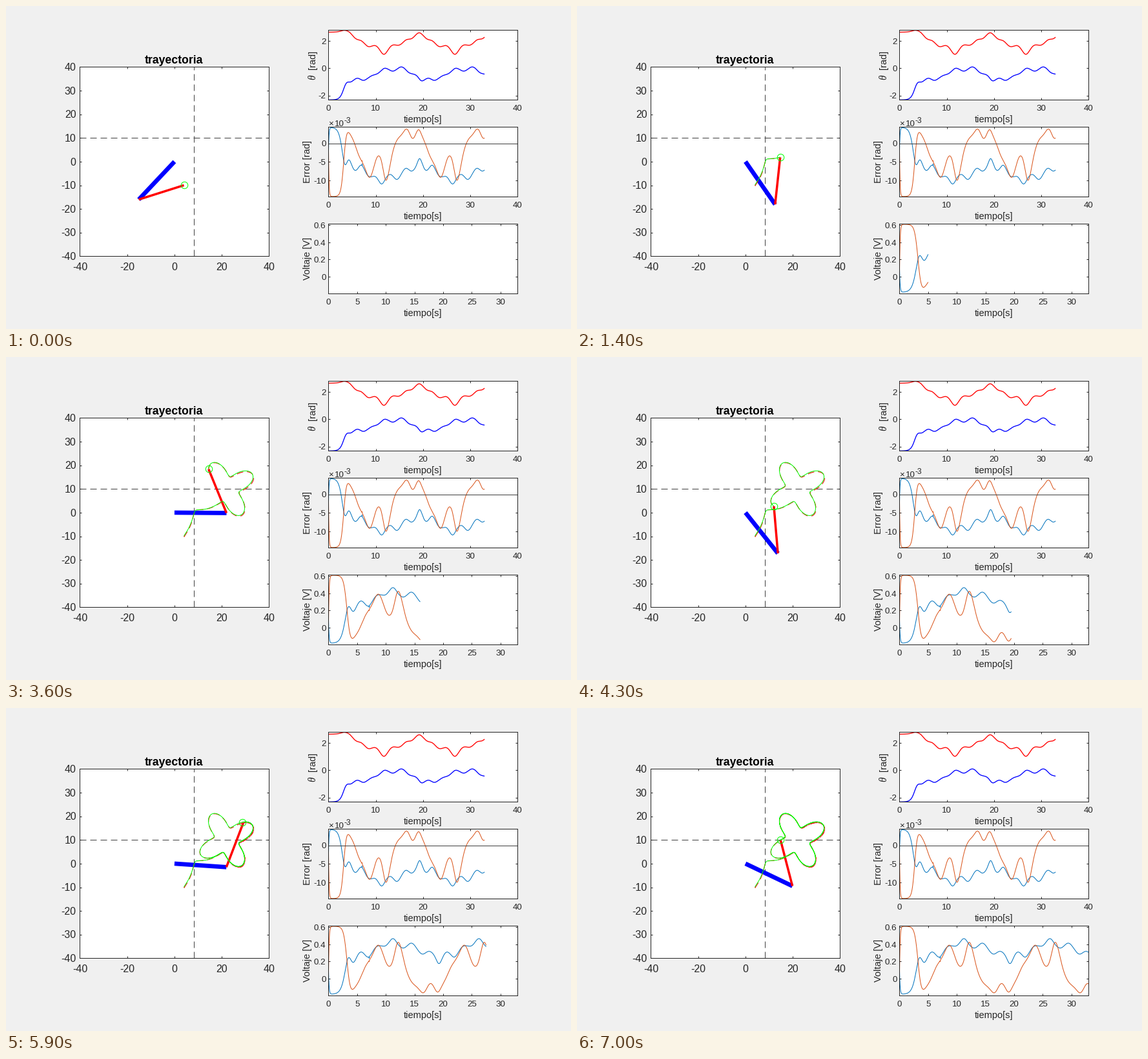
Animation, 875 px wide and 500 px high, one loop 7100 ms. Source, as a matplotlib script:

```python
import numpy as np
import matplotlib.pyplot as plt
from matplotlib.animation import FuncAnimation

W, H, DPI = 875, 500, 100
PX = 72 / DPI
INK = (0.15, 0.15, 0.15)
GREY = (0.25, 0.25, 0.25)
TEAL, RUST = (0, 0.447, 0.741), (0.85, 0.325, 0.098)
L1, L2 = 22, 20
DT, STEP, HOLD = 0.01, 50, 4

plt.rcParams["font.family"] = "Liberation Sans"
plt.rcParams["lines.solid_capstyle"] = "butt"
plt.rcParams["lines.scale_dashes"] = False
fig = plt.figure(figsize=(W / DPI, H / DPI), dpi=DPI, facecolor="#f0f0f0")


def label(x, y, s, size, ha="center", color=INK, **kw):
    """Horizontal text whose capitals are centred on pixel row y."""
    return fig.text(x / W, 1 - (y + 0.355 * size) / H, s, size=size * PX,
                    ha=ha, va="baseline", color=color, **kw)


def upright(x, y, s, size=14.6, **kw):
    fig.text(x / W, 1 - y / H, s, size=size * PX, rotation=90,
             ha="center", va="center", color=INK, **kw)


def panel(x, y, w, h, xlim, ylim, xticks, yticks, size, drop, gap, scale=1):
    """Boxed axes with inward ticks on all sides, placed in pixels."""
    ax = fig.add_axes([x / W, 1 - (y + h) / H, w / W, h / H])
    ax.set(xlim=xlim, ylim=ylim, xticks=xticks, yticks=yticks)
    ax.tick_params(direction="in", length=3 * PX, width=PX, color=INK,
                   top=True, right=True, labelbottom=False, labelleft=False)
    for spine in ax.spines.values():
        spine.set(linewidth=PX, color=INK)
    for v in xticks:
        px = x + w * (v - xlim[0]) / (xlim[1] - xlim[0])
        label(px, y + h + drop, f"{v:g}", size)
    for v in yticks:
        py = y + h * (ylim[1] - v) / (ylim[1] - ylim[0])
        label(x - gap, py, f"{v * scale:g}", size, ha="right")
    return ax


def forward(a, b):
    """Elbow and tip of the two-link arm."""
    elbow = L1 * np.cos(a), L1 * np.sin(a)
    tip = elbow[0] + L2 * np.cos(a + b), elbow[1] + L2 * np.sin(a + b)
    return elbow, tip


def inverse(x, y):
    b = np.arccos((x**2 + y**2 - L1**2 - L2**2) / (2 * L1 * L2))
    a = np.arctan2(y, x) - np.arctan2(L2 * np.sin(b), L1 + L2 * np.cos(b))
    return a, b


# Reference: a four-petal curve, faded in from the resting point
t = np.arange(0, 33 + DT / 2, DT)
phi = np.radians(24 * t + 108)
r = 9 + 3.6 * np.cos(4 * (phi - np.radians(30)))
fade = 1 / (1 + np.exp(-2 * (t - 3.5)))
ref_x = 4 + fade * (22 + r * np.cos(phi) - 4)
ref_y = -10 + fade * (10 + r * np.sin(phi) + 10)
th1, th2 = inverse(ref_x, ref_y)

# Motor voltages: gravity load plus speed term, with a start-up transient
start = np.exp(-t / 0.1)
blip = np.exp(-((t - 7.1) / 0.04) ** 2)
v1 = 0.376 * np.cos(th1) + 0.077 * np.cos(th1 + th2) + 0.16 * np.gradient(th1, DT)
v2 = 0.64 * np.cos(th1 + th2) + 0.32 * np.gradient(th2, DT)
v1 = v1 * (1 - start) + 0.12 * start - 0.02 * blip
v2 = v2 * (1 - start) - 0.012 * blip
e1, e2 = -v1 / 42.7, -v2 / 42.7
real1, real2 = th1 + e1, th2 + e2
real_x, real_y = forward(real1, real2)[1]

# Trajectory panel
arm = panel(114.4, 94.4, 293, 293, (-40, 40), (-40, 40), range(-40, 41, 20),
            range(-40, 41, 10), 16, 16.4, 6)
label(260, 82.5, "trayectoria", 17.6, color="black", weight="bold")
guide = dict(color=GREY, lw=PX, dashes=(10 * PX, 6 * PX), zorder=1)
arm.plot([-40, 40], [10, 10], **guide)
arm.plot([8.3, 8.3], [-40, 40], **guide)
link1, = arm.plot([], [], color="#0000ff", lw=6.7 * PX)
link2, = arm.plot([], [], color="#ff0000", lw=3.5 * PX)
real, = arm.plot([], [], color="#ff0000", lw=1.1 * PX, dashes=(10 * PX, 6 * PX))
ref, = arm.plot([], [], color="#00ff00", lw=PX)
ring, = arm.plot([], [], "o", ms=10.5 * PX, mfc="none", mec="#00ff00", mew=PX)

# Time panels
LEFT, WIDE, TALL = 499.4, 293, 108
tens = range(0, 41, 10)
small = (13.33, 12.3, 4)
angles = panel(LEFT, 37.4, WIDE, TALL, (0, 40), (-2.325, 2.78), tens,
               (-2, 0, 2), *small)
angles.plot(t, th1, color="#0000ff", lw=1.33 * PX)
angles.plot(t, th2, color="#ff0000", lw=1.33 * PX)
upright(475.5, 110, "θ", 15.5, family="Liberation Serif", style="italic")
upright(475, 83.5, "[rad]")

errors = panel(LEFT, 187.4, WIDE, TALL, (0, 40), (-0.0144, 0.0044), tens,
               (-0.01, -0.005, 0), *small, scale=1000)
errors.plot(t, e1, color=TEAL, lw=PX)
errors.plot(t, e2, color=RUST, lw=PX)
errors.plot([0, 40], [0, 0], color=GREY, lw=PX)
label(499.5, 181, "×", 13.33, ha="left")
label(509, 181, "10", 13.33, ha="left")
label(524, 177, "-3", 12, ha="left")
upright(467, 241, "Error [rad]")

volts = panel(LEFT, 337.4, WIDE, TALL, (0, 33), (-0.2, 0.615),
              range(0, 31, 5), (0, 0.2, 0.4, 0.6), *small)
volt1, = volts.plot([], [], color=TEAL, lw=PX)
volt2, = volts.plot([], [], color=RUST, lw=PX)
upright(467, 391, "Voltaje [V]")

for y in (175, 325, 475):
    label(646, y, "tiempo[s]", 14.6)


def draw(i):
    n = max(0, i - HOLD) * STEP
    (ex, ey), (tx, ty) = forward(real1[n], real2[n])
    link1.set_data([0, ex], [0, ey])
    link2.set_data([ex, tx], [ey, ty])
    ring.set_data([ref_x[n]], [ref_y[n]])
    m = n + 1 if n else 0
    real.set_data(real_x[:m], real_y[:m])
    ref.set_data(ref_x[:m], ref_y[:m])
    volt1.set_data(t[:m], v1[:m])
    volt2.set_data(t[:m], v2[:m])
    return link1, link2, real, ref, ring, volt1, volt2


anim = FuncAnimation(fig, draw, frames=71, interval=100, repeat=True,
                     repeat_delay=0, blit=False)
plt.show()
```
